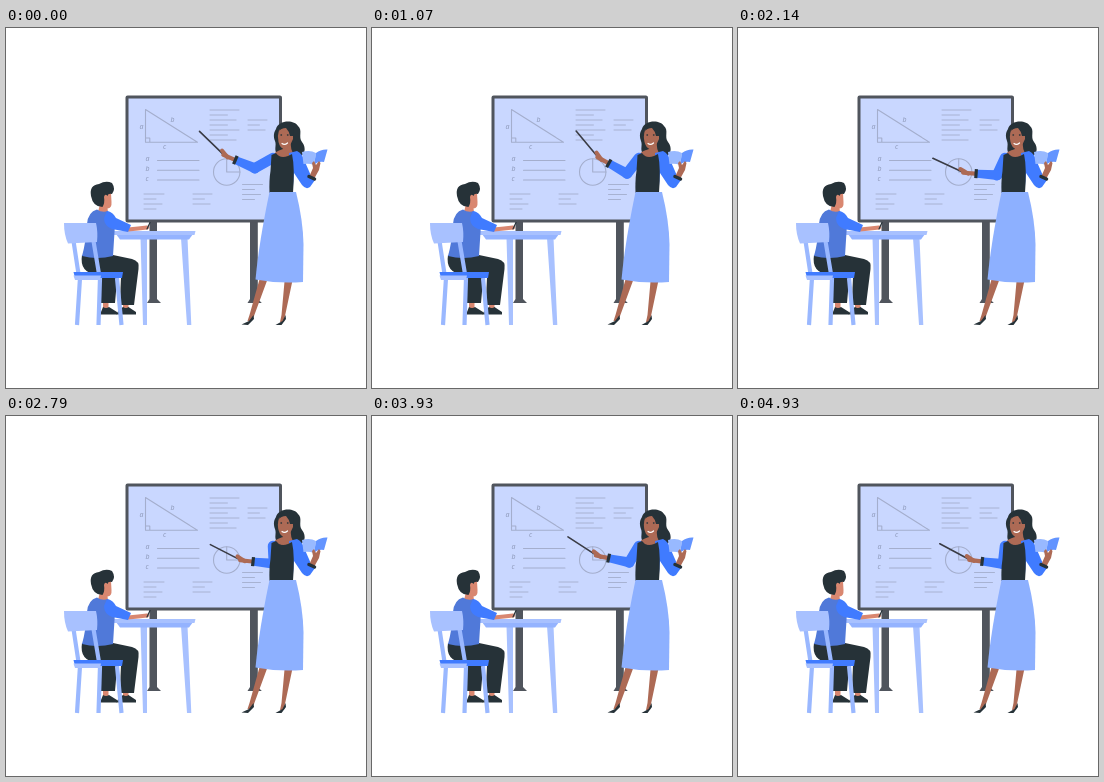
Recreate the animation shown at these times as an HTML page. Size 360 px wide and 360 px high, loop 5 s.

```html
<!DOCTYPE html>
<html>
<head>
<meta charset="utf-8">
<style>
html, body { margin: 0; width: 100%; height: 100%; overflow: hidden; background: #fff; }
svg { display: block; width: 100vw; height: 100vh; }
text { font: italic 7px "Open Sans", sans-serif; fill: #8d98b8; }
.line { fill: none; stroke-linecap: round; stroke-linejoin: round; }
.flat { stroke-linecap: butt; }
.dark { fill: #263238; }
.blue { fill: #407bff; }
.pale { fill: #a8c1ff; }
.skin { fill: #ad6a55; }
.tan { fill: #d98770; }
</style>
</head>
<body>
<svg viewBox="0 0 360 360">
  <!-- board -->
  <path d="M143.500 193h7.500v78l4 4h-14l2.500-4zM244 193h7.800v78l4 4h-14.300l2.500-4z" fill="#50555d"/>
  <rect x="121" y="69" width="153.500" height="124" rx=".6" fill="#c9d7ff" stroke="#50555d" stroke-width="3"/>
  <g class="line" stroke="#a4aecd" stroke-width="1.100">
    <path d="M139.500 81.500V114.300H191.500zM139.500 110h4.300v4.300"/>
    <path d="M151.500 132.500H193M151.500 142.300H193M151.500 152H193"/>
    <circle cx="220.700" cy="144" r="13.200"/>
    <path d="M220.700 130.800V144H234"/>
    <path id="notes" stroke-width=".9"/>
  </g>
  <text x="133.500" y="101">a</text><text x="164.500" y="94">b</text><text x="157" y="120.500">c</text>
  <text x="139.500" y="132.500">a</text><text x="139.500" y="143">b</text><text x="139.500" y="153">c</text>

  <!-- teacher -->
  <path class="dark" d="M270 101C272 92 288 91 292 98C297 102 292 109 296 114C301 120 299 130 290 129L272 127C267 122 271 118 269 113C267 108 268 104 270 101Z"/>
  <g class="skin">
    <path d="M255 246L243.500 287L241.500 293H245L248 288L262 250ZM279 248L275.500 287L274 294H278L279 288L287 250Z"/>
    <path d="M278 112L277 121Q268 124 266 128L274 134L288 126Q284 122 285 112Z"/>
    <path d="M273 102Q271 108 272.500 114Q274 120 278 121Q284 119 287 111L287 103L280 98Z"/>
  </g>
  <path class="dark" d="M272 104Q275 100 280 100Q283 103 284 108L288 108L287 98L278 95Z"/>
  <path class="line" d="M276 115.500Q278.500 117.500 281.500 115" stroke="#fff" stroke-width="1.200"/>
  <path class="line" d="M275 107h.5M281.500 107h.5" stroke="#263238" stroke-width="1.300"/>
  <path class="dark" d="M247.500 287L243 293L235.500 296.500L242 297L248 291ZM279.500 287L276.500 293L269.500 297H275.500L280 291Z"/>

  <path id="upper" class="line" stroke="#407bff" stroke-width="10.500"/>
  <g id="fore" class="line">
    <path d="M-33 0L-65.200 -12.400" stroke="#3a3c45" stroke-width="1.600"/>
    <path d="M-34 0L-22 0" stroke="#ad6a55" stroke-width="4.200"/>
    <path d="M-37 -3.500L-33 -1.500L-29 .5" stroke="#ad6a55" stroke-width="4"/>
    <path class="blue" d="M-20 -4L0 -5Q5 -4 5 0Q5 5 0 5L-20 4Z"/>
    <path class="flat" d="M-21 -4.500V4.500" stroke="#263238" stroke-width="3.200"/>
  </g>

  <path class="blue" d="M283 125L291 123Q297 126 299 134L306 150L309 152L304 159Q300 162 296 157L288 145L287 158L284 160Z"/>
  <path class="dark" d="M265.500 127L270 125Q274 131 282 128L286 126Q289 140 287 165H263.500Q263 152 264.500 143Z"/>
  <path d="M263.500 164H290Q297 192 297.500 216L297 254Q273 256 249.500 251.500Q253 214 263.500 164Z" fill="#8db0ff"/>
  <path d="M296 124Q304 121.500 310 125L308 137Q303 135 297.500 136Z" fill="#98b9ff"/>
  <path d="M310 125Q315 121 321.500 121.500L318 134Q312 133 308 137Z" fill="#6394ff"/>
  <path class="skin" d="M303.500 148L307 140L306 135L308 133L310 137L313 133L314.500 135L313 142L308 151Z"/>
  <path class="line" d="M303 148.500L308.500 151" stroke="#263238" stroke-width="3.500"/>

  <!-- table and pupil -->
  <path class="pale" d="M134.500 210H141L141 297H137ZM175 210H181.500L185.300 297H181Z"/>
  <path d="M110 206H187L183 211.500H114Z" fill="#94b3ff"/>
  <path class="pale" d="M107 203H189.500L188.500 207H108Z"/>
  <path class="tan" d="M97 272H102.500V282H97ZM117 274H122.500V282H117Z"/>
  <path class="dark" d="M90 240H111Q111 258 109 275H95Q96 260 90 240Z"/>
  <path class="dark" d="M97 279Q100 281 103 279L111 284V286.500H94Z"/>
  <path class="dark" d="M76 227H107L126 231Q134 233 132.500 241L128 277H114.500Q114 264 115 249L92 247Q73 245 76 227Z"/>
  <path class="dark" d="M117 279Q120 281 122.500 279L130 284V286.500H110.500Q111 283 117 279Z"/>
  <path class="tan" d="M94 176L92 184Q97 188 102 184L101.500 180.500Q106 180 105.500 174L105 165H97Z"/>
  <path class="dark" d="M85 168Q83 157 93 156Q100 152 106 155Q110 161 106 166Q102 165 101.500 168Q99 165 98 169Q99 175 96.500 179Q87 179 85 168Z"/>
  <path class="line" d="M122 201.500L132 200.500L141 199.500" stroke="#d98770" stroke-width="4.200"/>
  <path class="line" d="M141 201L144 194.500" stroke="#263238" stroke-width="1.200"/>
  <path d="M91 181.500Q82 184 81 196Q80 214 76 228Q91 232 107 228L109 196L102 183Q96 185 91 181.500Z" fill="#5079d9"/>
  <path class="blue" d="M101 183Q107 184 110 190L125 197L122 204L106 201Q98 198 98 190Z"/>

  <!-- chair -->
  <g class="line flat" stroke="#9ab8ff" stroke-width="4.200">
    <path d="M67.500 213L72.500 246M87.500 213L93 246M74 250L71 297M94 250L92.500 297M111 250L115.500 297"/>
  </g>
  <path class="pale" d="M58 195H90Q92 203 91 214L62 215.500Q58 207 58 195Z"/>
  <path class="blue" d="M67.500 244H117L116 250H69Z"/>
  <path class="pale" d="M67.500 247.500H95L94 252H69Z"/>
</svg>
<script>
const LOOP = 5000, STEPS = 70, RAD = Math.PI / 180;
const SHOULDER = { x: 265, y: 127 }, UPPER = 21;
const $ = id => document.getElementById(id);

// Paragraphs of ruled lines, every second line short
function lines(x, y, rows, width) {
  let d = '';
  for (let i = 0; i < rows; i++) {
    const part = i % 2 ? .6 : 1 - .1 * (i % 4 / 2);
    d += `M${x} ${y + i * 5}h${width * part}`;
  }
  return d;
}
$('notes').setAttribute('d', lines(204, 82, 7, 29) + lines(242, 92, 3, 19) +
  lines(236.5, 156.5, 4, 20) + lines(138, 166, 4, 20) + lines(187, 166, 3, 19));

// Gestures: step, swing of the upper arm, tilt of the forearm (degrees)
const gestures = [
  [0, 51, 23], [15, 28, 29], [30, 16.5, 4], [39, -8, 6],
  [48, 25, 17], [61, 19.5, 8], [69, 0, 7]
];

function armAt(step) {
  const next = Math.max(1, gestures.findIndex(g => g[0] >= step));
  const a = gestures[next - 1], b = gestures[next];
  const ease = (1 - Math.cos(Math.PI * (step - a[0]) / (b[0] - a[0]))) / 2;
  return a.map((v, i) => v + (b[i] - v) * ease);
}

function render(ms) {
  const step = Math.floor((ms + 5) * STEPS / LOOP) % STEPS;
  const [, swing, tilt] = armAt(step);
  const x = SHOULDER.x - UPPER * Math.sin(swing * RAD);
  const y = SHOULDER.y + UPPER * Math.cos(swing * RAD);
  $('upper').setAttribute('d', `M${SHOULDER.x + 2} ${SHOULDER.y + 3}L${x} ${y}`);
  $('fore').setAttribute('transform', `translate(${x} ${y}) rotate(${tilt})`);
}

const start = performance.now();
function tick() {
  render((performance.now() - start) % LOOP);
  requestAnimationFrame(tick);
}
tick();
</script>
</body>
</html>
```
